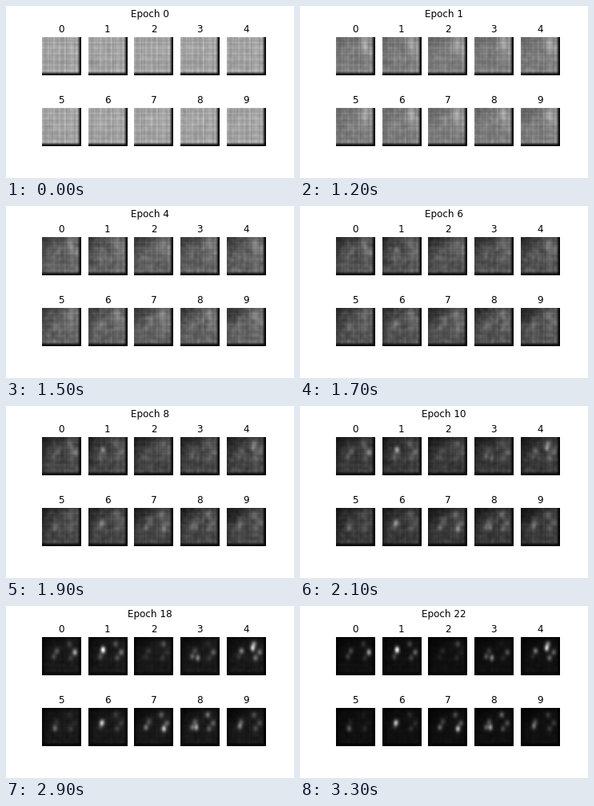
These frames come from a looping animation (360x216 px, 4400 ms). A matplotlib script:

```python
import numpy as np
import matplotlib.pyplot as plt
from matplotlib.animation import FuncAnimation

N = 28            # cells per side of a generated picture
FRAMES, STEP = 44, 100
HOLD, LAST = 11, 22

rng = np.random.default_rng(7)
pos = np.arange(N)
gx, gy = np.meshgrid(pos, pos)

# Brightest spot of each class: column, row, strength
PEAKS = [(23, 11, .5), (10, 9, .75), (21, 5, .2), (12, 15, .45), (18, 8, .75),
         (9, 15, .25), (9, 11, .6), (21, 15, .6), (11, 14, .55), (9, 13, .35)]
# Places where every class grows weaker spots
SHARED = [(10, 10), (8, 14), (19, 5), (23, 11), (20, 15)]


def spot(x, y, wide, tall):
    return np.exp(-((gx - x) / wide) ** 2 / 2 - ((gy - y) / tall) ** 2 / 2)


def smooth_noise(width):
    k = np.exp(-((pos[:, None] - pos) / width) ** 2 / 2)
    field = k @ rng.normal(size=(N, N)) @ k.T
    return (field - field.mean()) / field.std()


def stripes():
    wave = .025 * np.cos(np.pi * pos) + .04 * np.cos(np.pi * pos / 2)
    return 1 + wave + rng.normal(0, .03, N)


def class_spots(x, y, strength):
    field = strength * spot(x, y, 1.1, 1.6)
    for sx, sy in SHARED:
        field += strength * rng.uniform(.1, .6) * spot(sx, sy, 1.2, 1.5)
    return field


def smoothstep(t):
    t = np.clip(t, 0, 1)
    return t * t * (3 - 2 * t)


plaid = np.outer(stripes(), stripes())
grain = [smooth_noise(1) for _ in PEAKS]
details = [class_spots(*p) for p in PEAKS]
arch = sum(spot(x, y, 2, 2) for x, y in SHARED)
glow = spot(20, 5, 2, 4) + .5 * spot(25, 10, 1.5, 8)
shade = spot(1, 1, 8, 7)

# The last column and row stay black throughout
far = np.where(pos == N - 1, .02, np.where(pos == N - 2, .5, 1))


def picture(digit, epoch):
    p = epoch / LAST
    learned = 1 - np.exp(-epoch / 3)
    middle = np.sin(np.pi * p)

    base = .49 * np.exp(-(epoch / 12) ** 1.3) + .15 * np.exp(-2 * epoch) + .01
    tex = 1 + (.02 + .06 * learned) * grain[digit] - .45 * learned * shade
    tex += .4 * (1 - np.exp(-2 * epoch)) * np.exp(-epoch / 8) * glow
    img = base * plaid * tex
    img += .06 * middle * arch
    img += smoothstep((p - .1) / .8) * details[digit]

    edge = far * (1 - .8 * p * np.exp(-pos / 1.5))
    return np.clip(img * np.outer(edge, edge), 0, 1)


fig, axes = plt.subplots(2, 5, figsize=(5, 3), dpi=72)
fig.subplots_adjust(left=.125, right=.9, bottom=.125, top=.88, wspace=.2, hspace=.2)
heading = fig.suptitle("Epoch 0", fontsize=12)
images = []
for digit, ax in enumerate(axes.flat):
    ax.axis("off")
    ax.set_title(str(digit), fontsize=12)
    images.append(ax.imshow(picture(digit, 0), cmap="gray", vmin=0, vmax=1))


def update(frame):
    epoch = min(max(frame - HOLD, 0), LAST)
    heading.set_text(f"Epoch {epoch}")
    for digit, image in enumerate(images):
        image.set_data(picture(digit, epoch))
    return [heading, *images]


anim = FuncAnimation(fig, update, frames=FRAMES, interval=STEP,
                     repeat=True, repeat_delay=0)
plt.show()
```
